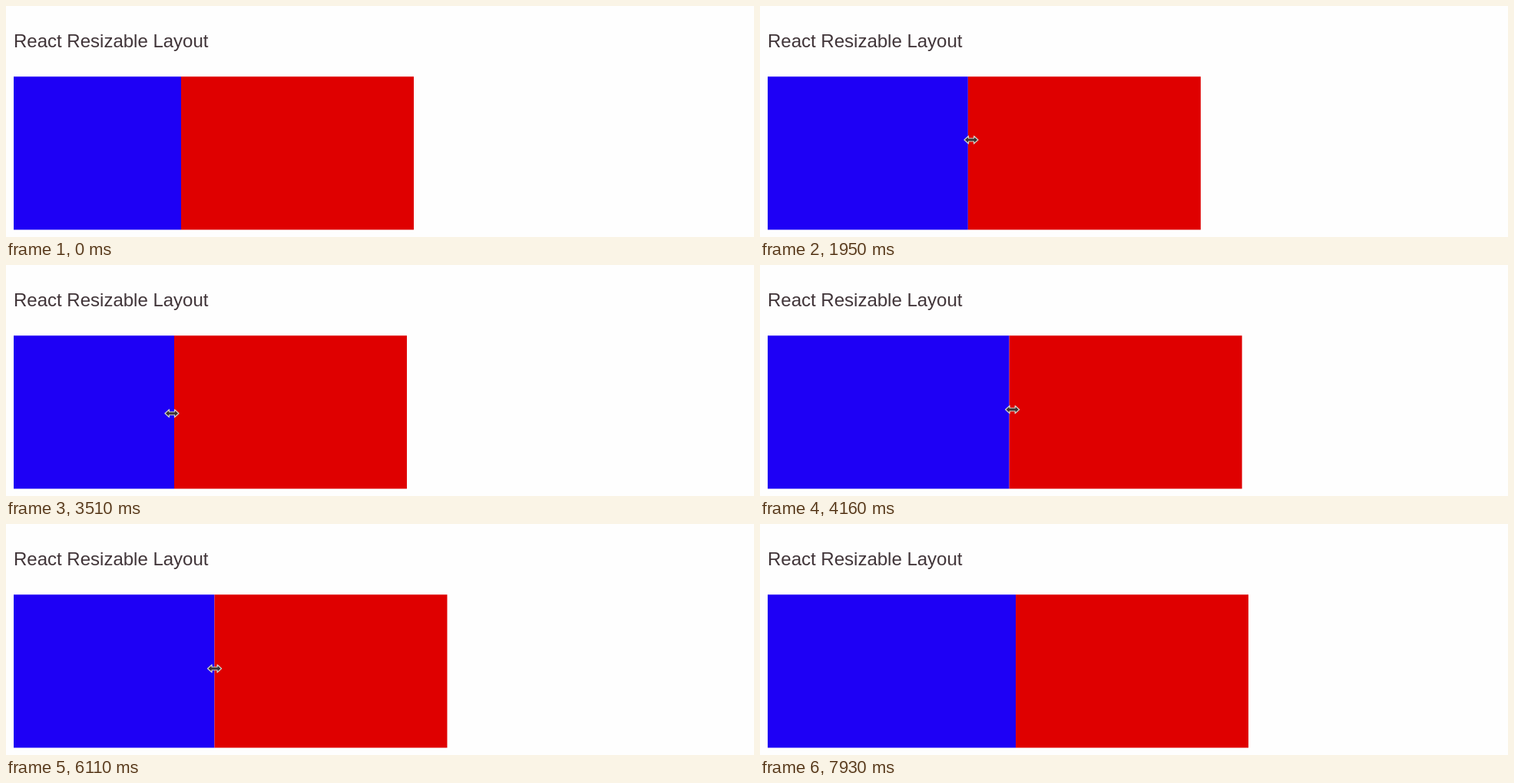
Write an HTML page that moves like this. It is 974 px wide and 302 px high and loops after 8.06 s.

```html
<!DOCTYPE html>
<html lang="en">
<head>
<meta charset="utf-8">
<title>React Resizable Layout</title>
<style>
  html, body { margin: 0; width: 100%; height: 100%; overflow: hidden; background: #fefefe; }
  svg { display: block; }
  text { font: 24px "Liberation Sans", Arial, sans-serif; fill: #413539; }
  .cursor { fill: #3b3434; stroke: #d2d2cc; stroke-width: 1.2; stroke-linejoin: round; }
</style>
</head>
<body>
<svg width="974" height="302" viewBox="0 0 974 302">
  <text x="10" y="54">React Resizable Layout</text>
  <rect id="left" x="10" y="92.3" height="200.2" fill="#1e00f5"/>
  <rect id="right" y="92.3" width="303" height="200.2" fill="#df0000"/>
  <path id="resize" class="cursor" d="M-9 0 L-3.5 -5 V-2 H3.5 V-5 L9 0 L3.5 5 V2 H-3.5 V5 Z"/>
  <path id="arrow" class="cursor" d="M0.5 0.5 V17 L4 13.6 L6.6 19.4 L9 18.3 L6.4 12.6 H11.3 Z"/>
</svg>
<script>
const TICK = 130, LOOP = 8060, REST = -3;
const ENTER = 4, GRAB = 11, RELEASE = 54, GONE = 59;
const el = id => document.getElementById(id);
const left = el('left'), right = el('right'), resize = el('resize'), arrow = el('arrow');

// linear: share of constant speed in the easing; lead: ticks the pointer runs ahead
const drags = [
  { start: 14, steps: 7, from: 228, to: 432.4, linear: 0.13, lead: 0.2 },
  { start: 22, steps: 6, from: 432.4, to: 219, linear: 0.5, lead: 0.36 },
  { start: 29, steps: 7, from: 219, to: 394.5, linear: 0.13, lead: 0.2 },
  { start: 38, steps: 5, from: 394.5, to: 210, linear: 0.47, lead: 0.36 },
  { start: 45, steps: 6, from: 210, to: 333, linear: 0, lead: 0.1 }
];
const heights = [[11, 180], [15, 175], [20, 164], [27, 194], [35, 186], [38, 178], [42, 190], [47, 189], [54, 187]];

const clamp = v => Math.min(1, Math.max(0, v));
const mix = (a, b, p) => a + (b - a) * p;
const smooth = p => p * p * (3 - 2 * p);

function divider(tick, leading) {
  const drag = drags.filter(d => d.start <= tick).pop();
  if (!drag) return drags[0].from;
  const p = clamp((tick - drag.start + 1 + (leading ? drag.lead : 0)) / drag.steps);
  return mix(drag.from, drag.to, mix(smooth(p), p, drag.linear));
}

function height(tick) {
  const i = heights.findIndex(h => h[0] > tick);
  if (i < 0) return heights[heights.length - 1][1];
  if (i === 0) return heights[0][1];
  const [a, b] = [heights[i - 1], heights[i]];
  return mix(a[1], b[1], (tick - a[0]) / (b[0] - a[0]));
}

function pointer(tick, edge) {
  if (tick < GRAB) {
    const p = smooth((tick - ENTER + 1) / (GRAB - ENTER));
    return { x: mix(400, 226, p), y: mix(268, 180, p), free: true };
  }
  if (tick >= RELEASE) {
    const p = (tick - RELEASE + 1) / (GONE - RELEASE);
    return { x: mix(331, 400, p), y: mix(187, 268, p), free: true };
  }
  const x = divider(tick, true) + REST;
  return { x, y: height(tick), free: x - edge < -12 };
}

function place(shape, shown, p) {
  shape.setAttribute('visibility', shown ? 'visible' : 'hidden');
  shape.setAttribute('transform', `translate(${p.x} ${p.y})`);
}

function draw(now) {
  const tick = Math.floor(now % LOOP / TICK);
  const edge = divider(tick, false);
  const p = pointer(tick, edge);
  const shown = tick >= ENTER && tick < GONE;
  left.setAttribute('width', edge - 10);
  right.setAttribute('x', edge);
  place(resize, shown && !p.free, p);
  place(arrow, shown && p.free, p);
}

let began;
function loop(now) {
  began ??= now;
  draw(now - began);
  requestAnimationFrame(loop);
}
draw(0);
requestAnimationFrame(loop);
</script>
</body>
</html>
```
